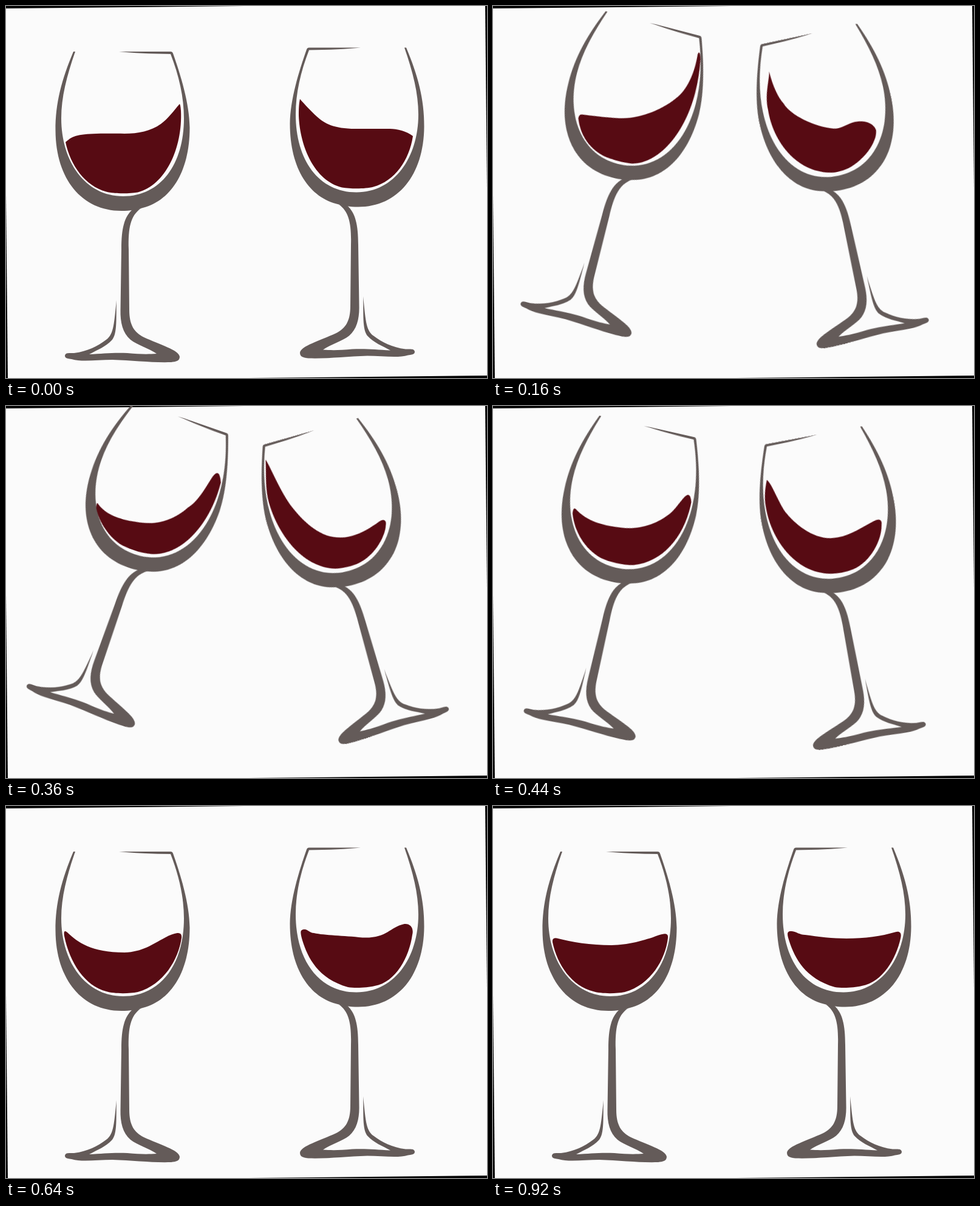
Animation, 792 px wide and 612 px high, one loop 0.96 s. Source, as an HTML page without scripts:

```html
<!DOCTYPE html>
<html lang="en">
<head>
<meta charset="utf-8">
<title>Clinking wine glasses</title>
<style>
  html, body { margin: 0; width: 100%; height: 100%; overflow: hidden; background: #000; }
  svg { display: block; width: 792px; height: 612px; }
  .page { fill: #fbfbfb; }
  .glass { fill: #645b59; }
  .wine { fill: #570b13; }

  /* The small lead keeps each 40 ms step clear of its boundary. */
  .tilt, .wine { animation: 960ms -5ms infinite; }
  .left { --tilt: 25.6deg; transform-origin: 407px 332px; }
  .right { --tilt: -21deg; transform-origin: 443px 331px; }
  .tilt { animation-name: clink; }
  .left .wine { animation-name: slosh-left; }
  .right .wine { animation-name: slosh-right; }

  @keyframes clink {
    0% { transform: rotate(0deg); animation-timing-function: steps(7); }
    29.1667% { transform: rotate(var(--tilt)); animation-timing-function: steps(8); }
    62.5%, 100% { transform: rotate(0deg); }
  }

  /* Both liquids run clockwise from the upper left. */
  @keyframes slosh-left {
    0% {
      d: path("M98 224Q100 222 103 220C116 210 134 209.5 195 210C218 210 238 206 255 194C266 186 276 173 285.5 161.5Q287 160 288 172C291 235 262 295 217 306.5C202 309 178 309 165 305.5C130 296 106 262 98 224Z");
      animation-timing-function: steps(4);
    }
    16.6667% {
      d: path("M112 257Q111 249 118 249C133 247 150 245 178 239.5C208 233 240 210 258 186C272 170 279 140 275.5 105Q277 96 282 112C302 215 265 294 217 306.5C202 309 178 309 165 305.5C138 298 121 280 112 257Z");
      animation-timing-function: steps(2);
    }
    25% {
      d: path("M122 279Q119 273 125 273C137 271 170 263 195 255C212 250 234 234 246 208C258 191 275 160 269 82Q270 74 274 86C309 215 265 294 217 306.5C202 309 178 309 165 305.5C143 299 130 290 122 279Z");
      animation-timing-function: steps(3);
    }
    37.5% {
      d: path("M109 262Q106 252 109 254C121 263 142 271 190 259.5C215 254 238 236 251 212C264 197 268 170 273 150Q279 132 289 155C295 225 268 290 220 303.5C203 308 181 308 165 305C138 297 118 278 109 262Z");
      animation-timing-function: steps(4);
    }
    54.1667% {
      d: path("M98 222Q98 209 105 213C122 224 145 235 197 232.5C225 229 245 219 260 211C268 206 274 199 282 198Q291 194 291 206C289 248 266 283 221 301C206 305 182 305 166 301C134 292 108 262 98 222Z");
      animation-timing-function: steps(3);
    }
    66.6667% {
      d: path("M96 214Q94 202 101 208C118 224 140 241 195 241C225 240 240 228 262 216.5C270 212 276 210 282 209Q290 208 289 217C284 252 260 294 217 306C202 309 178 309 165 305C130 296 105 258 96 214Z");
      animation-timing-function: steps(7);
    }
    95.8333%, 100% {
      d: path("M98 224Q97 216 105 217.5C130 224 160 229 195 229C225 228 240 223 262 216.5C270 213 276 211 281 210.5Q289 209 288 217C284 252 260 294 217 306C202 309 178 309 165 305C130 296 106 262 98 224Z");
    }
  }

  @keyframes slosh-right {
    0% {
      d: path("M484 153C492 162 500 171 512 182C524 193 540 202 575 202C595 202 615 202 632 202C644 202 660 206 670 214C664 254 640 288 605 297.5C592 301 568 301 553 298.5C508 287 484 232 482 180C482 165 483 158 484 153Z");
      animation-timing-function: steps(4);
    }
    16.6667% {
      d: path("M501 115C501 132 505 158 513 171C520 193 556 220 585 229C600 233 612 223 628 226C642 228 652 236 653 246C651 266 622 291 595 298C585 300 574 301 564 298.5C511 286 483 230 486 176C486 150 497 132 501 115Z");
      animation-timing-function: steps(2);
    }
    25% {
      d: path("M491 110C496 130 501 150 512 179C522 202 545 231 569 243C592 250 598 228 627 230C644 231 652 244 651 260C649 277 617 299 592 299.5C580 300 563 299 552 294C503 275 482 222 484 170C484 150 485 130 491 110Z");
      animation-timing-function: steps(3);
    }
    37.5% {
      d: path("M494 93C499 110 503 151 515 181C525 205 543 238 572 248C595 257 622 251 646 242C655 239 659 243 655 251C651 264 630 290 600 297.5C588 301 570 300 556 297C502 280 480 213 480 163C480 140 488 118 494 93Z");
      animation-timing-function: steps(4);
    }
    54.1667% {
      d: path("M484 160C493 159 497 174 503 186C516 205 545 231 578 232C612 231 628 214 652 209C664 206 669 207 667 218C664 250 637 290 604 296.5C592 298 582 299 573 298C505 290 476 225 478.5 178C478 170 479 161 484 160Z");
      animation-timing-function: steps(3);
    }
    66.6667% {
      d: path("M492 203C497 203 500 209 507 209C525 213 555 213 587 216.5C628 218 630 200 656 194C665 193 672 200 669 212C664 248 642 290 607 296C595 299 575 300 563 298C514 284 497 250 488 221C484 207 484 203 492 203Z");
      animation-timing-function: steps(7);
    }
    95.8333%, 100% {
      d: path("M492 206C500 207 505 212 514 212C535 215 560 218 582 218C612 218 640 214 662 207.5C671 205 673 210 671 218C664 250 642 290 607 296C595 299 575 300 563 298C514 284 497 250 488 223C484 211 483 205 492 206Z");
    }
  }
</style>
</head>
<body>
<svg viewBox="0 0 792 612">
  <defs>
    <g id="glass">
      <path d="M111 75C92 120 81 160 81.500 205C82 285 125 337 190 337C205 337 215 335 222 333C270 322 302.500 275 302.500 200C302 160 288 115 275 78Q274 75 271 75L186 75Q220 78.500 271 79C285 115 293 150 293 185C293 260 255 313 193 313C130 313 91 255 91 185C91 150 100 115 114 75Z"/>
      <path d="M208 335C195 347 190 365 190 400L188.500 500C188 520 192 538 205 549C215 557 235 563 248 572C235 573 220 573 200 571C175 570 160 572 137 573C150 566 165 560 174 550C184 540 181 510 182 484C178 520 178 540 165 549C150 560 135 568 112 571C103 571 98 570 97 575C97 578 98 580 108 581C125 586 150 582 175 582C210 583 240 587 272 586C280 585 286 584 286 577C285 566 253 557 227 545C211 537 203 525 203 500L202 400C201 365 205 345 222 333Z"/>
    </g>
  </defs>

  <rect width="792" height="612"/>
  <path class="page" d="M0 4L392 0H789L792 300V608L400 612H3L0 310Z"/>

  <g class="tilt left">
    <use class="glass" href="#glass"/>
    <path class="wine"/>
  </g>
  <g class="tilt right">
    <use class="glass" href="#glass" transform="matrix(-1 0 0 1 770 -6.5)"/>
    <path class="wine"/>
  </g>
</svg>
</body>
</html>
```
